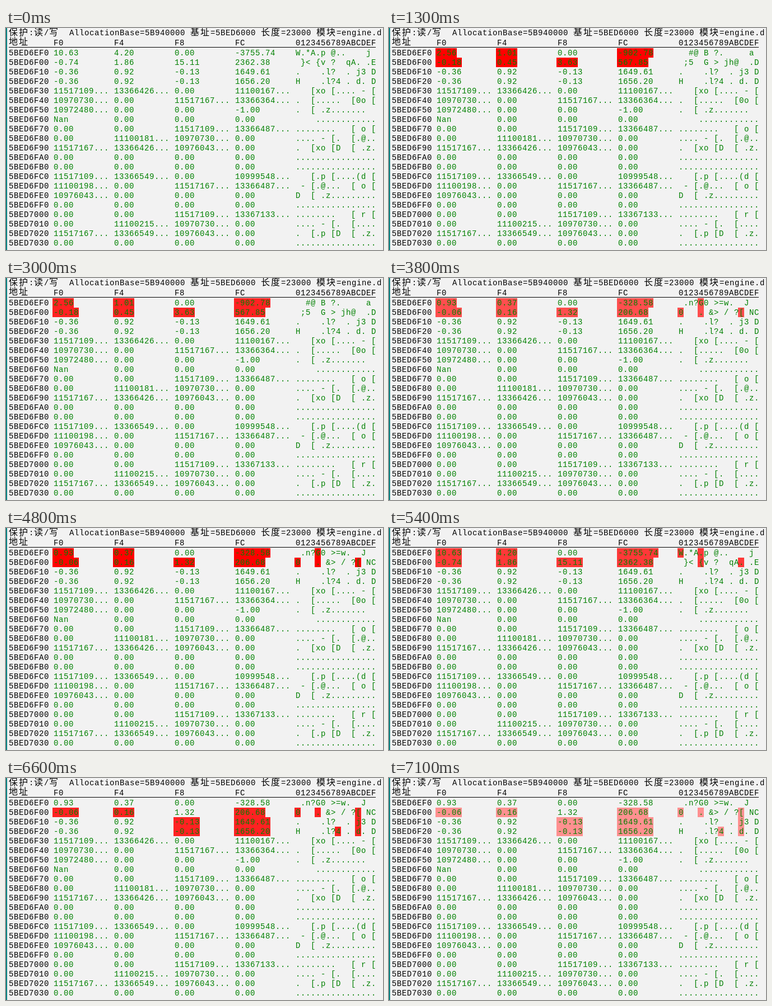
These frames come from a looping animation (673x397 px, 7200 ms). An HTML page:

```html
<!DOCTYPE html>
<html lang="zh">
<head>
<meta charset="utf-8">
<title>Memory view</title>
<style>
html, body { margin: 0; width: 100%; height: 100%; overflow: hidden; background: #f2f2f2; }
svg { display: block; }
text { font: 14px "Liberation Mono", "Courier New", monospace; letter-spacing: 0.6px; white-space: pre; fill: #008000; }
.ink { fill: #000; }
.cjk { font: 300 16px "Noto Sans CJK SC", "Noto Sans CJK", sans-serif; letter-spacing: 2px; }
</style>
</head>
<body>
<svg id="stage" width="673" height="397" viewBox="0 0 673 397">
  <rect width="673" height="397" fill="#f2f2f2"/>
  <rect width="2" height="397" fill="#008080"/>
  <rect x="5" y="34" width="655" height="1" fill="#000"/>
  <g id="marks"></g>
  <g id="texts"></g>
</svg>
<script>
const NS = "http://www.w3.org/2000/svg";
const CELL = 9, ROW = 17, TOP = 36, LOOP = 7200, STEP = 100;
const COLS = [85, 193, 301, 409], ASCII = 517;
const marks = document.getElementById("marks");
const texts = document.getElementById("texts");
const DOTS = ".".repeat(16);
const Z = "0.00";

// Pointers shown as numbers, cut off by the column width
const P = n => n + "...";
const a = P(11517109), b = P(11517167), c = P(10970730), d = P(10976043);

// Four values and the byte text of each row
const rows = [
  null,
  null,
  ["-0.36", "0.92", "-0.13", "1649.61", ".    .l?  . j3 D"],
  ["-0.36", "0.92", "-0.13", "1656.20", "H    .l?4 . d. D"],
  [a, P(13366426), Z, P(11100167), "   [xo [.... - ["],
  [c, Z, b, P(13366364), ".  [.....  [0o ["],
  [P(10972480), Z, Z, "-1.00", ".  [ .z.......  "],
  ["Nan", Z, Z, Z, "    ............"],
  [Z, Z, a, P(13366487), "........   [ o ["],
  [Z, P(11100181), c, Z, ".... - [.  [.@.."],
  [b, P(13366426), d, Z, ".  [xo [D  [ .z."],
  [Z, Z, Z, Z, DOTS],
  [Z, Z, Z, Z, DOTS],
  [a, P(13366549), Z, P(10999548), "   [.p [....(d ["],
  [P(11100198), Z, b, P(13366487), " - [.@...  [ o ["],
  [d, Z, Z, Z, "D  [ .z........."],
  [Z, Z, Z, Z, DOTS],
  [Z, Z, a, P(13367133), "........   [ r ["],
  [Z, P(11100215), c, Z, ".... - [.  [...."],
  [b, P(13366549), d, Z, ".  [.p [D  [ .z."],
  [Z, Z, Z, Z, DOTS]
];

// The two live rows at each zoom level
const far = [
  ["10.63", "4.20", Z, "-3755.74", "W.*A.p @..    j "],
  ["-0.74", "1.86", "15.11", "2362.38", " }< {v ?  qA. .E"]
];
const mid = [
  ["2.56", "1.01", Z, "-902.78", "  #@ B ?.     a "],
  ["-0.18", "0.45", "3.63", "567.85", " ;5  G > jh@  .D"]
];
const near = [
  ["0.93", "0.37", Z, "-328.58", " .n?G0 >=w.  J  "],
  ["-0.06", "0.16", "1.32", "206.68", "0   . &> / ?[ NC"]
];

// Marked cells: [row, value columns, byte columns]
const farHot = [[0, [0, 1, 3], [0, 4]], [1, [0, 1, 2, 3], [4, 12]]];
const midHot = [[0, [0, 1, 3], []], [1, [0, 1, 2, 3], []]];
const nearHot = [[0, [0, 1, 3], [4]], [1, [0, 1, 2, 3], [0, 4, 12]]];
const turnHot = [[1, [0, 1, 3], [0, 4, 12]], [2, [2, 3], [12]], [3, [2, 3], [8, 12]]];

const events = [
  [0, far, []],
  [1100, mid, midHot],
  [1600, near, nearHot],
  [2000, far, farHot],
  [2900, mid, midHot],
  [3500, near, nearHot],
  [4100, far, farHot],
  [4500, mid, midHot],
  [4800, near, nearHot],
  [5200, far, farHot],
  [5600, mid, midHot],
  [6000, near, nearHot],
  [6500, near, turnHot]
];
const FADE_FROM = 1600;
const stalls = [2700, 3700, 3900, 4700, 5000, 6200];

function add(parent, tag, attrs, str) {
  const el = document.createElementNS(NS, tag);
  for (const key in attrs) el.setAttribute(key, attrs[key]);
  if (str !== undefined) el.textContent = str;
  return parent.appendChild(el);
}

const put = (x, y, str, cls = "") => add(texts, "text", { x, y, class: cls }, str);

// Wide characters take two cells
function putMixed(x, y, str) {
  for (const run of str.match(/[\u4e00-\u9fff]+|[^\u4e00-\u9fff]+/g)) {
    const wide = run.charCodeAt(0) > 255;
    put(x, y, run, wide ? "ink cjk" : "ink");
    x += run.length * CELL * (wide ? 2 : 1);
  }
}

const xs = [...COLS, ASCII];
const baseline = r => TOP + 13 + r * ROW;
const putRow = (r, vals) => vals.map((v, i) => put(xs[i], baseline(r), v));

putMixed(5, 13, "保护:读/写  AllocationBase=5B940000 基址=5BED6000 长度=23000 模块=engine.dll");
putMixed(5, 30, "地址");
["F0", "F4", "F8", "FC", "0123456789ABCDEF"].forEach((s, i) => put(xs[i], 31, s, "ink"));
rows.forEach((vals, r) => {
  put(5, baseline(r), (0x5BED6EF0 + r * 16).toString(16).toUpperCase(), "ink");
  if (vals) putRow(r, vals);
});
const live = far.map((vals, r) => putRow(r, vals));

function mark(x, r, len) {
  add(marks, "rect", { x: x - 2, y: TOP + r * ROW, width: len * CELL + 2, height: ROW });
}

let shown = null;
function show(event) {
  const [, vals, hot] = event;
  live.forEach((cells, r) => cells.forEach((el, i) => { el.textContent = vals[r][i]; }));
  marks.replaceChildren();
  for (const [r, cols, bytes] of hot) {
    for (const i of cols) mark(COLS[i], r, (vals[r] || rows[r])[i].length);
    for (const i of bytes) mark(ASCII + i * CELL, r, 1);
  }
  shown = event;
}

function draw(time) {
  let t = Math.floor((time % LOOP) / STEP) * STEP;
  if (stalls.includes(t)) t -= STEP;
  const event = events.findLast(e => e[0] <= t);
  if (event !== shown) show(event);
  const age = Math.max(0, t - Math.max(event[0], FADE_FROM)) / STEP;
  const v = age ? Math.min(240, 12 + 22 * age) : 0;
  marks.setAttribute("fill", `rgb(255,${v},${v})`);
}

const start = performance.now();
function tick() {
  draw(performance.now() - start);
  requestAnimationFrame(tick);
}
tick();
</script>
</body>
</html>
```
